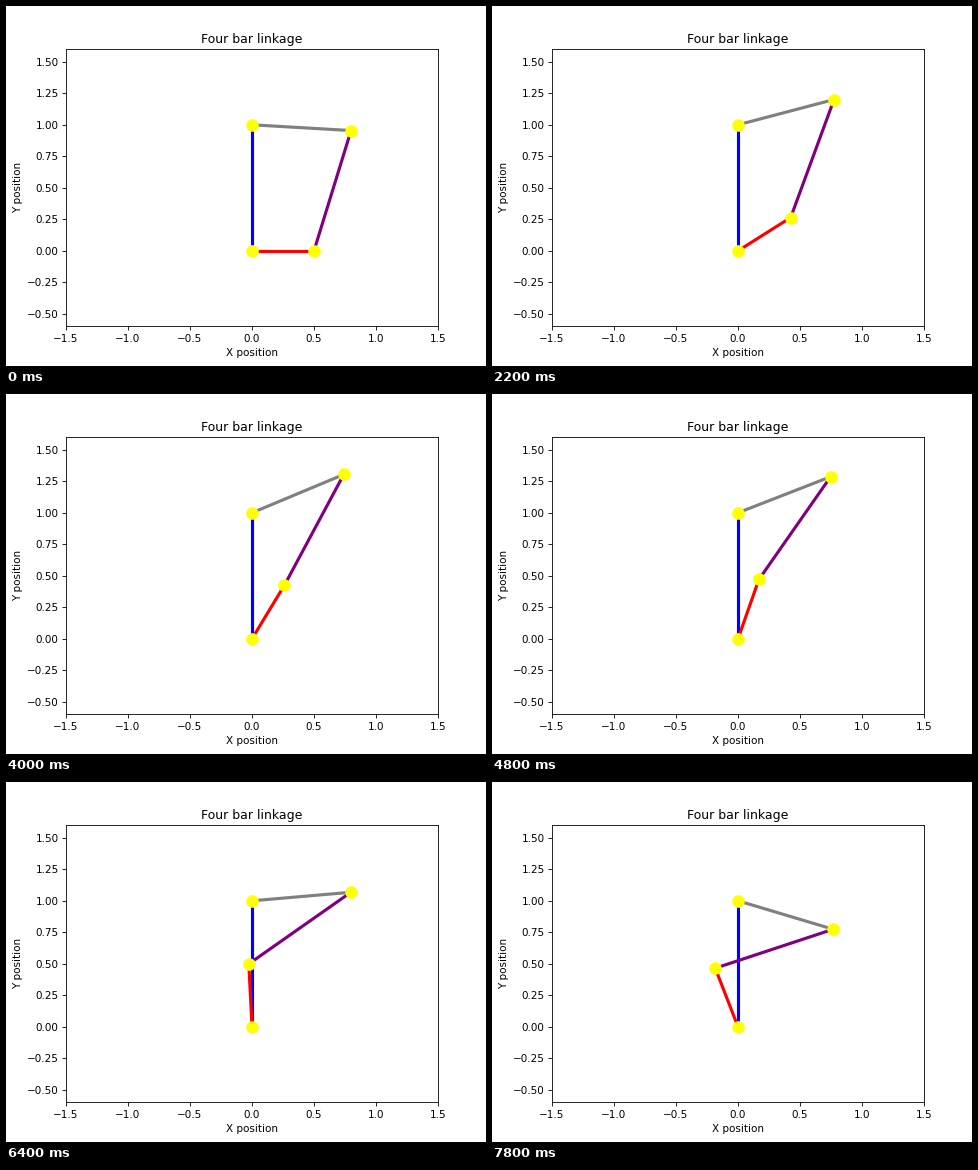
A matplotlib script for the animation above (8000 ms loop, 480 px wide and 360 px high).

```python
import numpy as np
import matplotlib.pyplot as plt
from matplotlib.animation import FuncAnimation

FRAMES, INTERVAL = 40, 200
CRANK, COUPLER, ROCKER, GROUND = 0.5, 1.0, 0.8, 1.0
INERTIA = 0.2    # rocker inertia relative to the crank
SPEED = 0.05206  # crank speed with the rocker at rest, rad per step


def rocker_angle(theta):
    """Rocker direction for a crank angle, from the circle intersection."""
    dx = CRANK * np.cos(theta)
    dy = CRANK * np.sin(theta) - GROUND
    dist = np.hypot(dx, dy)
    cos_gap = (dist**2 + ROCKER**2 - COUPLER**2) / (2 * ROCKER * dist)
    return np.unwrap(np.arctan2(dy, dx)) + np.arccos(cos_gap)


# The linkage coasts freely: the crank slows as the rocker takes up energy.
grid = np.linspace(0, 2.2, 2201)
ratio = np.gradient(rocker_angle(grid), grid)
pace = np.sqrt(1 + INERTIA * ratio**2) / SPEED
steps = np.concatenate([[0], np.cumsum((pace[1:] + pace[:-1]) / 2 * np.diff(grid))])
crank = np.interp(np.arange(FRAMES), steps, grid)
rocker = np.interp(crank, grid, rocker_angle(grid))

fig, ax = plt.subplots(figsize=(6.4, 4.8), dpi=75)
ax.set(xlim=(-1.5, 1.5), ylim=(-0.6, 1.6), title="Four bar linkage",
       xlabel="X position", ylabel="Y position")

bars = [ax.plot([], [], color=color, lw=3)[0]
        for color in ("blue", "red", "purple", "gray")]
joints, = ax.plot([], [], "o", color="yellow", ms=11, zorder=3)


def draw(i):
    base, top = (0, 0), (0, GROUND)
    p = (CRANK * np.cos(crank[i]), CRANK * np.sin(crank[i]))
    q = (ROCKER * np.cos(rocker[i]), GROUND + ROCKER * np.sin(rocker[i]))
    for bar, ends in zip(bars, [(base, top), (base, p), (p, q), (q, top)]):
        bar.set_data(*zip(*ends))
    joints.set_data(*zip(base, p, q, top))
    return [*bars, joints]


anim = FuncAnimation(fig, draw, frames=FRAMES, interval=INTERVAL,
                     repeat=True, repeat_delay=0)
plt.show()
```
